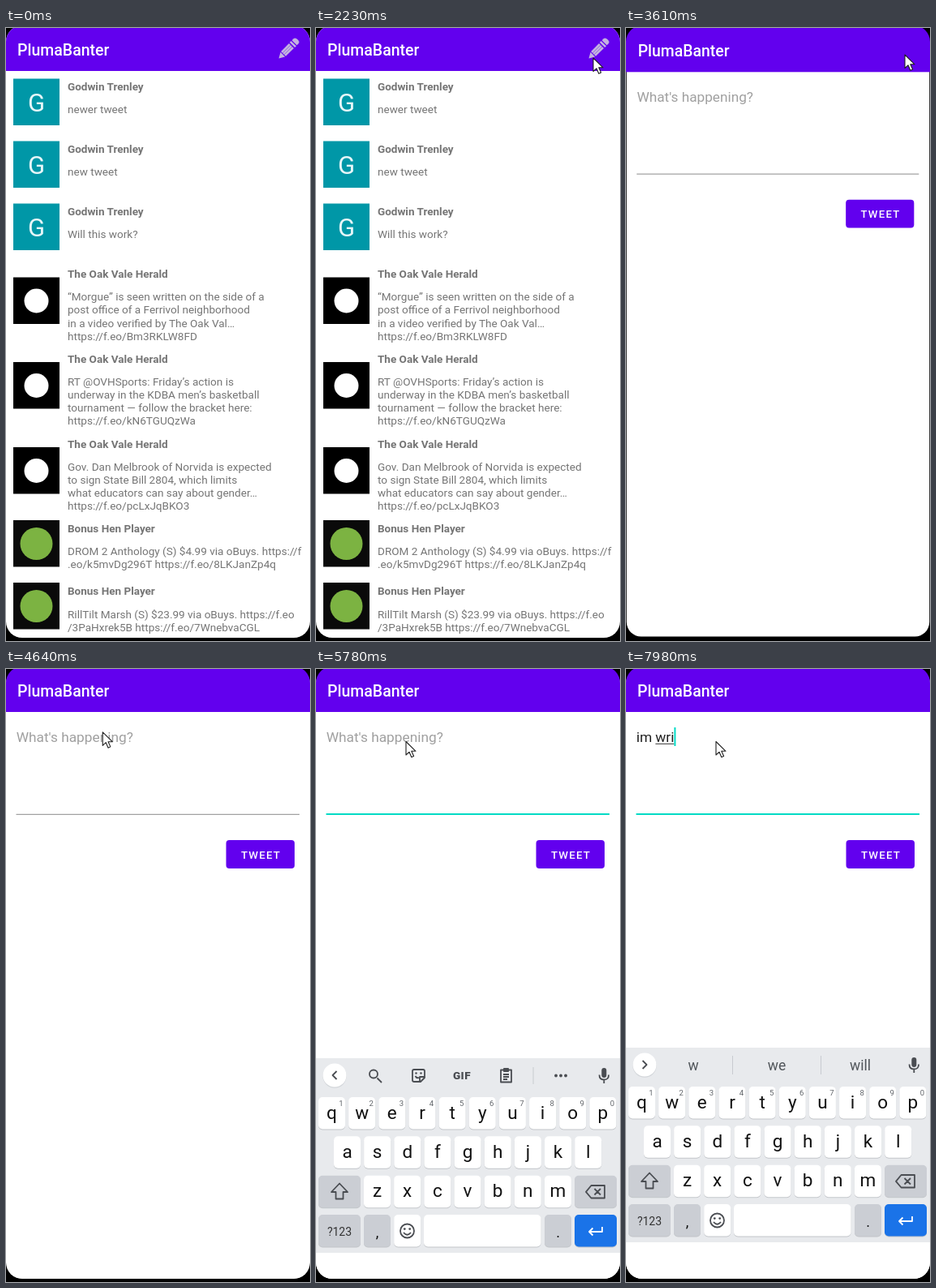
Write an HTML page that moves like this. It is 375x756 px and loops after 8000 ms.

```html
<!DOCTYPE html>
<html lang="en">
<head>
<meta charset="utf-8">
<style>
html, body { margin: 0; width: 100%; height: 100%; overflow: hidden; background: #000; }
svg { display: block; width: 375px; height: 756px; font-family: Roboto, "Open Sans", sans-serif; }
text { white-space: pre; }
.title { font-size: 19.5px; font-weight: 500; fill: #fff; }
.name { font-size: 13.5px; font-weight: 700; fill: #757575; }
.body { font-size: 13.55px; fill: #757575; }
.input { font-size: 17.3px; }
.letter { font-size: 22.5px; fill: #111; text-anchor: middle; }
.digit { font-size: 9.5px; fill: #5f6368; text-anchor: middle; }
.word { font-size: 17.5px; fill: #50555a; text-anchor: middle; }
.icon { fill: none; stroke: #4a4d52; stroke-width: 1.8; stroke-linejoin: round; }
</style>
</head>
<body>
<svg id="stage" viewBox="0 0 375 756"></svg>
<script>
const LOOP = 8000;
const PURPLE = "#6200ee", TEAL = "#03dac5", GREY_KEY = "#cbced4";

const rect = (x, y, w, h, fill, r = 0) =>
  `<rect x="${x}" y="${y}" width="${w}" height="${h}" rx="${r}" fill="${fill}"/>`;
const circle = (x, y, r, fill, extra = "") =>
  `<circle cx="${x}" cy="${y}" r="${r}" fill="${fill}" ${extra}/>`;
const text = (cls, x, y, str, extra = "") =>
  `<text class="${cls}" x="${x}" y="${y}" ${extra}>${str}</text>`;
const icon = (d, extra = "") => `<path class="icon" d="${d}" ${extra}/>`;

// List screen
const person = { name: "Godwin Trenley", bg: "#0097a7", mark: (y) =>
  text("", 37.5, y + 40, "G", 'font-size="31" fill="#e6f6f8" text-anchor="middle"') };
const paper = { name: "The Oak Vale Herald", bg: "#000", mark: (y) => circle(37.5, y + 29, 15, "#fff") };
const deals = { name: "Bonus Hen Player", bg: "#0a0a0a", mark: (y) => circle(37.5, y + 29, 20, "#7cb342") };

const posts = [
  [person, 62.5, 77, ["newer tweet"]],
  [person, 139.5, 154, ["new tweet"]],
  [person, 216.5, 231, ["Will this work?"]],
  [paper, 307.5, 308, ["“Morgue” is seen written on the side of a",
    "post office of a Ferrivol neighborhood", "in a video verified by The Oak Val…", "https://f.eo/Bm3RKLW8FD"]],
  [paper, 412, 412.8, ["RT @OVHSports: Friday’s action is",
    "underway in the KDBA men’s basketball", "tournament — follow the bracket here:", "https://f.eo/kN6TGUQzWa"]],
  [paper, 517, 517.6, ["Gov. Dan Melbrook of Norvida is expected",
    "to sign State Bill 2804, which limits", "what educators can say about gender…", "https://f.eo/pcLxJqBKO3"]],
  [deals, 607, 622, ["DROM 2 Anthology (S) $4.99 via oBuys. https://f", ".eo/k5mvDg296T https://f.eo/8LKJanZp4q"]],
  [deals, 684, 699.3, ["RillTilt Marsh (S) $23.99 via oBuys. https://f.eo", "/3PaHxrek5B https://f.eo/7WnebvaCGL"]],
];

const post = ([who, top, base, lines]) =>
  rect(9, top, 57, 57.5, who.bg) + who.mark(top) + text("name", 76, base, who.name) +
  lines.map((line, i) => text("body", 76, base + 28.3 + i * 16.1, line)).join("");

const appBar = rect(-10, -10, 395, 63, PURPLE) + text("title", 14, 34, "PlumaBanter");
const pencil = `<g transform="translate(348.5 25.5) rotate(-45)" fill="#c3b2e0">
  <path d="M-17 0L-10 -4V4Z"/><path d="M-9 -4.2H5V4.2H-9Z"/><path d="M6.5 -4.5H9V4.5H6.5Z"/>
  <path d="M10.2 -4.3H13Q16 -4.3 16 0T13 4.3H10.2Z"/>
  <path d="M-9 -1.3H5M-9 1.4H5" stroke="#8d62d6" stroke-width=".8"/></g>`;

const listScreen = rect(-10, -10, 395, 776, "#fff") + posts.map(post).join("") + appBar + pencil +
  `<circle id="ripple" cx="348" cy="26" fill="#fff"/>`;

// Compose screen
const composeScreen = rect(0, 0, 375, 752, "#fff", 18) + appBar +
  text("input", 12.7, 90.3, "What's happening?", 'id="hint" fill="#a0a0a0"') +
  text("input", 12.7, 90.3, "", 'id="typed" fill="#202020"') +
  `<rect id="compose-line" y="91.8" height="1" fill="#333"/>
   <rect id="caret" y="72" width="2" height="23" fill="${TEAL}"/>
   <rect id="field-line" x="12.5" width="349.5"/>` +
  rect(271.5, 211, 84.5, 35, PURPLE, 4) +
  text("", 314.5, 233.7, "TWEET",
    'fill="#fff" font-size="13.3" font-weight="500" letter-spacing="1.2" text-anchor="middle"');

// Keyboard
const PITCH = 37.15;
const key = (x, y, w, fill = "#fff") => rect(x, y + 1, w, 39.5, "#c3c6ca", 5) + rect(x, y, w, 39.5, fill, 5);
const keyRow = (letters, x0, y, digits = "") => [...letters].map((c, i) => {
  const x = x0 + i * PITCH;
  return key(x, y, 33, "#fff") + text("letter", x + 16.5, y + 26.7, c) +
    (digits ? text("digit", x + 28, y + 11, digits[i]) : "");
}).join("");

const tools = `<g id="tools">` +
  icon("M75.5 491.5L81 497", 'stroke-width="2.2"') + circle(71, 486.5, 5, "none", 'class="icon"') +
  icon("M121 481H132Q134 481 134 483V491L129 496H121Q119 496 119 494V483Q119 481 121 481ZM134 490H128V496M122.5 489Q124 492 127 491") +
  circle(123.5, 485.5, 1.2, "#4a4d52") + circle(129.5, 485.5, 1.2, "#4a4d52") +
  text("", 180, 493, "GIF", 'font-size="13.5" font-weight="900" fill="#4a4d52" text-anchor="middle" letter-spacing=".5"') +
  icon("M228 481.5H241V496.5H228Z") + rect(231, 479, 7, 5, "#4a4d52", 1) +
  icon("M231 487H238M231 490H238M231 493H236", 'stroke-width="1.3"') +
  rect(267.5, 478, 1, 21, "#c8cbd0") +
  [296, 302, 308].map((x) => circle(x, 488.5, 1.9, "#4a4d52")).join("") + `</g>`;

const suggestions = `<g id="suggestions">` +
  text("word", 83, 494.8, "w") + text("word", 186, 494.8, "we") + text("word", 289, 494.8, "will") +
  rect(131, 477, 1, 23, "#c8cbd0") + rect(240, 477, 1, 23, "#c8cbd0") + `</g>`;

const keyboard = rect(0, 467, 375, 241, "#e8eaed") + rect(0, 707, 375, 170, "#fff") +
  circle(23, 489, 14.7, "#d3d6da") + circle(23, 488, 14.5, "#fff") +
  `<path id="chevron" class="icon" stroke-width="2"/>` + tools + suggestions +
  rect(352.3, 479, 6, 12, "#4a4d52", 3) + icon("M349.5 487.5Q349.5 493.5 355.3 493.5T361 487.5M355.3 493.5V498") +
  keyRow("qwertyuiop", 3, 515, "1234567890") +
  keyRow("asdfghjkl", 22, 563.3) +
  key(3, 611.7, 52, GREY_KEY) + keyRow("zxcvbnm", 59, 611.7) + key(319, 611.7, 52, GREY_KEY) +
  icon("M29 621.5L39 632H33.5V640.5H24.5V632H19Z") +
  icon("M339.5 624H356V639.5H339.5L333 631.8ZM343.5 628L351 635.5M351 628L343.5 635.5") +
  key(3, 660, 52, GREY_KEY) + text("", 29, 685.5, "?123", 'font-size="14" fill="#333" text-anchor="middle"') +
  key(59, 660, 33, GREY_KEY) + text("letter", 75.5, 688, ",", 'style="font-size:18px"') +
  key(96.2, 660, 33) + circle(112.5, 680, 8.5, "none", 'class="icon"') +
  circle(109.3, 677.6, 1.4, "#4a4d52") + circle(115.7, 677.6, 1.4, "#4a4d52") + icon("M108 682Q112.5 687.5 117 682") +
  key(133, 660, 144.5) +
  key(282, 660, 33, GREY_KEY) + text("letter", 298.5, 688, ".", 'style="font-size:18px"') +
  key(319, 660, 52, "#1a73e8") + icon("M353 675V681H337M341.5 676.5L337 681L341.5 685.5", 'style="stroke:#fff"');

document.getElementById("stage").innerHTML = `
  <clipPath id="screen"><rect y="-3" width="375" height="755" rx="20"/></clipPath>
  <g clip-path="url(#screen)">
    <g id="list">${listScreen}</g>
    <g id="compose">${composeScreen}</g>
    <g id="keyboard">${keyboard}</g>
  </g>
  <path id="cursor" d="M0 0V16.5L4 12.8L6.8 19.3L9.6 18L6.8 11.8H12Z" fill="#fff" stroke="#222" stroke-width="1.1" stroke-linejoin="round"/>`;

const el = (id) => document.getElementById(id);
const ids = ["list", "compose", "keyboard", "cursor", "ripple", "hint", "typed", "compose-line", "caret",
  "field-line", "tools", "suggestions", "chevron"];
const ui = Object.fromEntries(ids.map((id) => [id, el(id)]));
const set = (id, attrs) => { for (const k in attrs) ui[id].setAttribute(k, attrs[k]); };
const show = (id, on) => set(id, { visibility: on ? "visible" : "hidden" });
const zoom = (s) => `translate(187.5 378) scale(${s}) translate(-187.5 -378)`;

// Progress in n held steps: the first at `from`, the last at `to`.
const stepped = (t, from, to, n) => t < from ? 0 :
  Math.min(n, Math.floor((t - from) / (to - from) * (n - 1) + 1.05)) / n;
// Latest entry of a [time, ...values] list.
const latest = (t, keys) => keys.reduce((found, k) => t >= k[0] ? k : found, keys[0]);

const along = (points, u) => {
  const s = u * (points.length - 1), i = Math.min(Math.floor(s), points.length - 2), f = s - i;
  return points[i].map((a, j) => a + (points[i + 1][j] - a) * f);
};

const moves = [
  [650, 850, 4, [[388, 800], [352, 590], [317, 458]]],
  [1180, 1940, 12, [[317, 458], [303, 390], [301, 300], [325, 190], [362, 100], [356, 62], [347, 46]]],
  [2020, 2500, 8, [[347, 46], [342, 37], [344, 33]]],
  [3680, 4440, 12, [[344, 33], [270, 50], [180, 72], [135, 76], [122, 74]]],
  [4640, 4910, 4, [[122, 74], [111, 89.5]]],
];
const listZoom = [[0, 1], [3400, 1.009], [3470, 1.045], [3540, 1.08]];
const composeIn = [[0, 0.9, 0], [3470, 0.94, 0.55], [3540, 0.985, 1], [3610, 0.996, 1], [3680, 1, 1]];
const keyboardIn = [[0, 300, 0], [5660, 121, 0.52], [5710, 48, 0.82], [5780, 13, 1], [5850, 0, 1]];
const typing = [[0, "", 0], [7060, "i", 0], [7200, "im", 0], [7400, "im ", 3], [7540, "im w", 3], [7980, "im wri", 3]];
const FOCUS = 5010;
const caretTimes = [[0, false], [FOCUS, true], [5510, false], [6050, true], [6530, false], [7060, true]];

function draw(t) {
  const move = latest(t, moves);
  const [cx, cy] = along(move[3], stepped(t, move[0], move[1], move[2]));
  set("cursor", { transform: `translate(${cx} ${cy})` });
  show("cursor", t >= 650);

  set("list", { transform: zoom(latest(t, listZoom)[1]) });
  show("list", t < 3610);
  const press = stepped(t, 2830, 3330, 8);
  set("ripple", { r: 8 + 14 * Math.min(1, press * 2), opacity: press ? 0.2 * (1 - press) : 0 });

  const [, scale, alpha] = latest(t, composeIn);
  set("compose", { transform: zoom(scale), opacity: alpha });
  const focused = t >= FOCUS;
  set("field-line", focused ? { y: 178, height: 2, fill: TEAL } : { y: 178.8, height: 1, fill: "#8a8a8a" });

  const [, str, wordStart] = latest(t, typing);
  ui.typed.textContent = str;
  const width = (n) => n ? ui.typed.getSubStringLength(0, n) : 0;
  const end = width(str.length), start = width(wordStart);
  ui.hint.setAttribute("opacity", str ? 0 : 1);
  set("compose-line", { x: 12.7 + start, width: Math.max(0, end - start) });
  set("caret", { x: 12.7 + end, opacity: latest(t, caretTimes)[1] ? 1 : 0 });

  const [, drop, kbAlpha] = latest(t, keyboardIn);
  set("keyboard", { transform: `translate(0 ${drop})`, opacity: kbAlpha });
  const suggest = stepped(t, 7600, 7800, 3);
  set("tools", { opacity: t < 7600 ? 1 : 0 });
  set("suggestions", { opacity: suggest });
  set("chevron", { d: t < 7600 ? "M25.5 483L20.5 488L25.5 493" : "M20.5 483L25.5 488L20.5 493" });
}

const origin = performance.now();
function tick() {
  draw((performance.now() - origin) % LOOP);
  requestAnimationFrame(tick);
}
tick();
</script>
</body>
</html>
```
